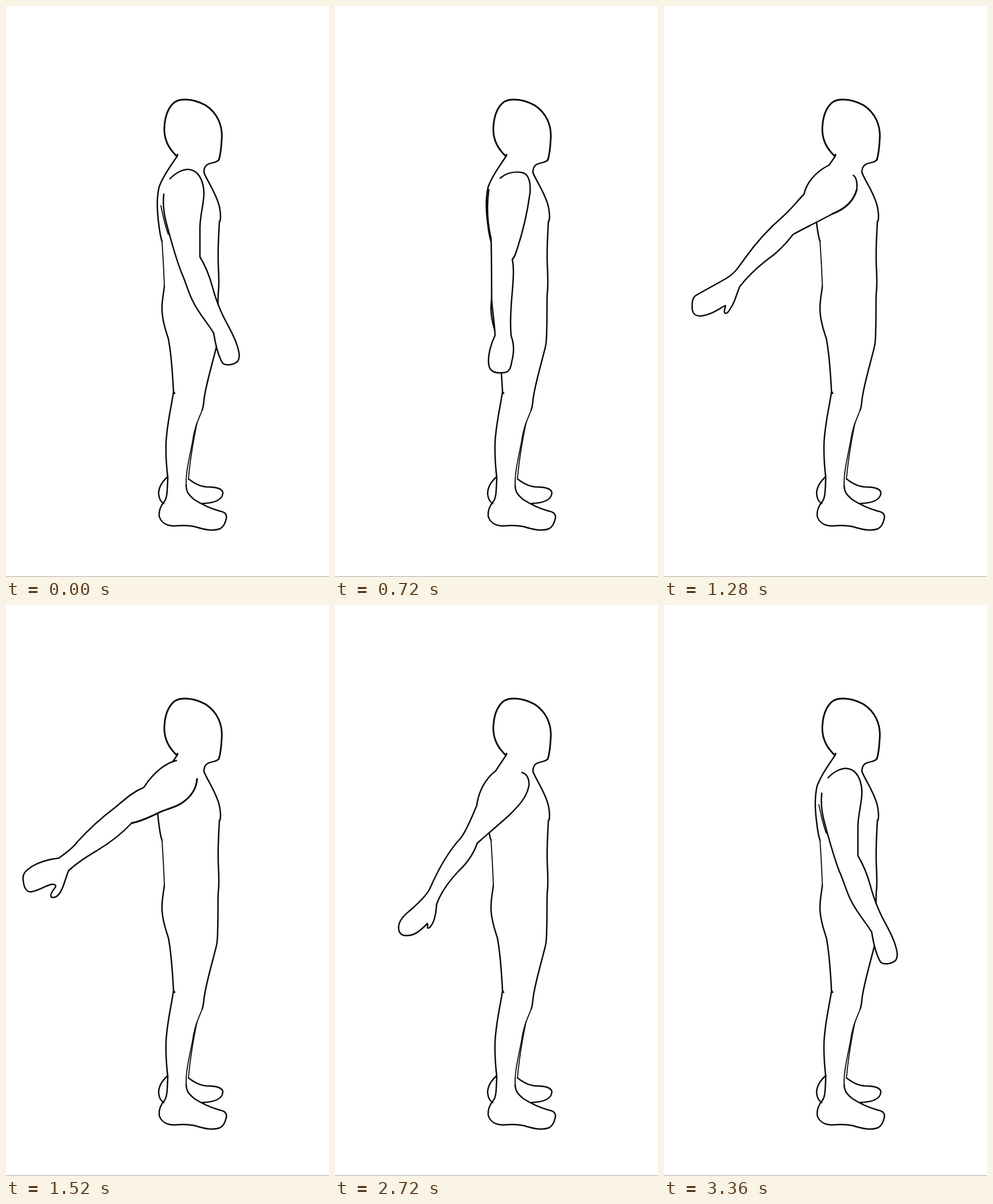
These frames come from a looping animation (563 by 995 pixels, 3920 ms). An HTML page:

```html
<!DOCTYPE html>
<html lang="en">
<head>
<meta charset="utf-8">
<title>Arm swing</title>
<style>
  html, body { margin: 0; width: 100%; height: 100%; overflow: hidden; background: #fff; }
  svg { display: block; width: 100%; height: 100%; }
  path { fill: none; stroke: #080808; stroke-width: 2.5; stroke-linecap: round; stroke-linejoin: round; }
  .bold { stroke-width: 2.9; }
  .thin { stroke-width: 1.8; }

  /* Each arm pose is filled white so that it hides the torso behind it. */
  .arm { visibility: hidden; animation: 3920ms step-end infinite; }
  .arm path:first-child { fill: #fff; }
  .forward  { animation-name: forward; }
  .lowering { animation-name: lowering; }
  .hanging  { animation-name: hanging; }
  .behind   { animation-name: behind; }
  .rising   { animation-name: rising; }
  .high     { animation-name: high; }
  .top      { animation-name: top; }

  @keyframes forward {
    0%, 85.714% { visibility: visible; }
    16.326% { visibility: hidden; }
    100% { visibility: visible; }
  }
  @keyframes lowering {
    0%, 18.367%, 85.714%, 100% { visibility: hidden; }
    16.326%, 83.673% { visibility: visible; }
  }
  @keyframes hanging {
    0%, 24.489%, 83.673%, 100% { visibility: hidden; }
    18.367%, 77.551% { visibility: visible; }
  }
  @keyframes behind {
    0%, 28.571%, 77.551%, 100% { visibility: hidden; }
    24.489%, 73.469% { visibility: visible; }
  }
  @keyframes rising {
    0%, 32.653%, 73.469%, 100% { visibility: hidden; }
    28.571%, 69.387% { visibility: visible; }
  }
  @keyframes high {
    0%, 38.775%, 69.387%, 100% { visibility: hidden; }
    32.653%, 61.224% { visibility: visible; }
  }
  @keyframes top {
    0%, 61.224%, 100% { visibility: hidden; }
    38.775% { visibility: visible; }
  }
</style>
</head>
<body>
<svg viewBox="0 0 563 995" preserveAspectRatio="none">
  <rect y="994" width="563" height="1" fill="#a6a6a6"/>

  <!-- head and neck -->
  <path class="bold" d="M299 259L298 262C285 250 275 235 276 212C277 188 286 168 302 164C318 161 335 166 348 173C368 186 378 208 376 232C375 250 373 262 371 268"/>
  <path d="M371 268C367 274 357 272 350 277C346 280 345 284 345 290"/>
  <!-- chest, front leg and near foot -->
  <path d="M345 290C350 304 367 327 372 350C374 360 375 368 373 375"/>
  <path d="M372 375C371 395 369 420 370 450C371 475 372 485 370 500C369 515 370 540 369 565C369 580 368 590 366 597C359 625 350 655 346 680C344 692 345 696 342 704"/>
  <path class="thin" d="M342 704C335 722 328 735 325 760C319 790 313 815 314 835"/>
  <path d="M314 835C314 848 320 853 328 860C342 869 358 876 372 880C384 882 385 888 384 893C382 902 379 908 373 911C362 915 348 913 335 909C320 904 305 905 294 906C280 906 270 900 267 889C266 878 270 870 277 862C281 855 281 845 282 822"/>
  <!-- back -->
  <path d="M298 262C290 275 275 293 267 315C262 335 263 355 266 378C268 395 270 405 272 410"/>
  <path class="thin" d="M272 410C273 430 275 455 276 488"/>
  <path d="M276 488C275 500 271 515 272 532C273 552 279 567 283 580C288 605 290 635 292 672L294 675"/>
  <path d="M292 672C288 700 281 725 279 760C278 785 280 805 282 822"/>
  <!-- far leg and foot -->
  <path class="thin" d="M333 726C327 755 321 790 318 824"/>
  <path d="M282 820C273 828 266 838 266 850C267 860 271 865 275 867"/>
  <path d="M318 824C326 830 336 837 350 838C368 838 378 842 378 849C377 859 368 866 342 867"/>

  <g class="arm forward">
    <path d="M286 301C295 291 310 283 320 285C335 287 344 303 345 325C345 345 339 360 338 385C338 405 338 425 338 437C346 450 354 468 360 490C364 505 369 520 376 535C385 555 397 572 403 592C407 605 408 612 404 619C396 626 385 627 378 623C371 612 366 595 362 570C352 553 335 535 325 513C317 497 313 480 306 465C298 445 288 410 280 380C275 362 273 345 275 328"/>
    <path class="thin" d="M270 348C274 368 278 385 283 398"/>
  </g>
  <g class="arm lowering">
    <path d="M286 302C295 291 312 286 323 287C336 290 342 310 341 332C340 352 333 370 332 385C330 410 327 430 324 450C330 475 331 500 335 530C338 550 338 562 343 570C351 580 356 592 355 605C356 615 355 619 351 622C343 626 332 625 324 621C317 612 315 595 317 573C313 553 302 535 296 512C290 490 288 475 286 460C284 440 282 420 279 410C273 390 269 372 269 347"/>
  </g>
  <g class="arm hanging">
    <path d="M288 300C298 291 312 288 325 290C338 292 341 308 340 325C336 355 327 395 317 425C314 434 312 440 309 441C313 460 310 485 308 510C306 535 305 555 307 575C313 590 312 605 308 620C306 634 302 639 292 639C280 640 270 638 268 625C266 610 271 590 279 574C278 550 274 530 273 510C273 480 273 440 272 405C266 380 264 350 268 320"/>
  </g>
  <g class="arm behind">
    <path d="M319 292C330 291 337 296 338 308C341 330 328 350 310 372C297 390 285 410 273 429C268 450 262 465 255 478C243 498 234 522 229 550C230 570 228 585 224 593L221 589C212 602 203 612 190 615C180 617 172 614 171 604C172 590 180 575 188 564C197 551 203 543 206 528C211 505 214 485 220 468C230 438 242 405 250 377C252 355 257 335 263 318C268 306 276 296 284 284"/>
    <path class="bold" d="M221 589C212 602 203 612 190 615C180 617 172 614 171 604C172 590 180 575 188 564"/>
  </g>
  <g class="arm rising">
    <path d="M326 292C335 294 339 304 338 315C334 336 320 350 304 366C285 383 265 400 248 415C240 438 228 452 215 464C198 482 184 502 177 522C176 540 172 555 165 562C158 566 163 558 161 555C150 566 140 576 126 576C115 577 110 570 111 560C112 548 122 540 131 532C145 520 158 508 165 495C178 465 195 432 220 405C232 388 240 365 247 350C250 325 262 303 280 289"/>
  </g>
  <g class="arm high">
    <path d="M330 295C337 300 337 310 336 320C330 342 312 355 294 362C270 375 245 387 225 398C212 415 198 430 180 442C162 456 145 472 132 489C127 500 124 515 117 525C113 532 110 537 106 535C103 531 108 526 107 522C95 528 82 538 66 540C55 541 50 537 49 527C49 517 49 508 56 504C72 495 90 485 108 475C122 467 128 458 140 441C160 413 180 390 207 367C222 354 232 340 244 328C248 310 262 290 288 277"/>
    <path class="bold" d="M336 320C330 342 312 355 294 362"/>
  </g>
  <g class="arm top">
    <path d="M333 303C332 320 322 335 305 346C292 354 280 355 266 362C250 370 235 377 219 380C205 395 185 412 160 427C142 438 125 448 109 463C104 475 101 490 95 500C90 508 84 511 79 509C76 505 81 498 86 492C88 487 84 486 78 487C65 491 55 499 42 500C34 499 31 490 30 480C28 467 35 463 46 455C60 447 75 443 92 441C105 432 117 423 125 412C145 390 170 368 190 353C206 340 220 326 240 318C252 300 270 278 297 271"/>
    <path class="bold" d="M333 303C332 320 322 335 305 346C292 354 280 355 266 362C250 370 235 377 219 380"/>
  </g>
</svg>
</body>
</html>
```
